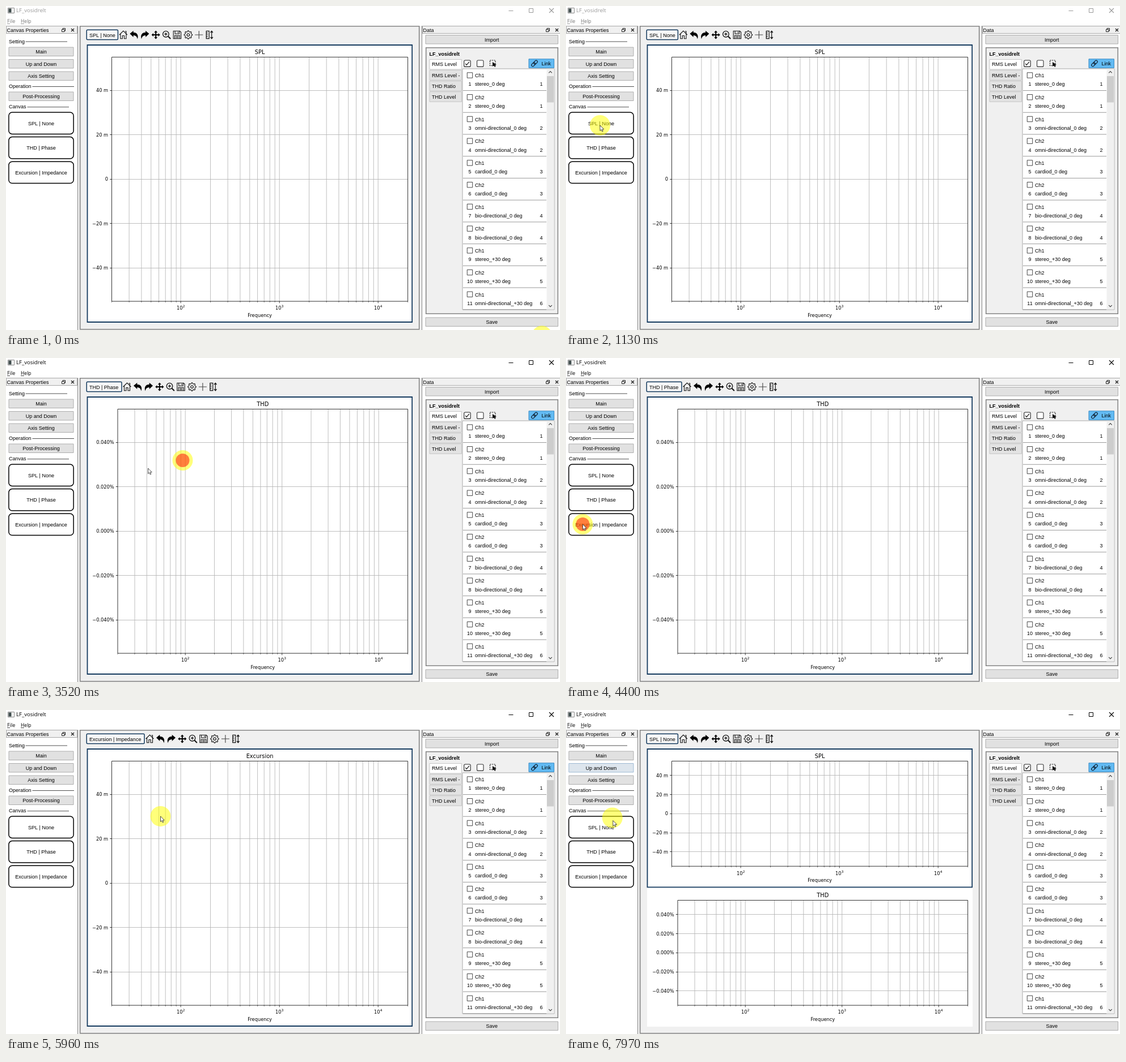
These frames come from a looping animation (977x573 px, 8000 ms). An HTML page with a canvas:

```html
<!DOCTYPE html>
<html lang="en">
<head>
<meta charset="utf-8">
<title>Canvas layout demo</title>
<style>
html, body { margin: 0; width: 100%; height: 100%; overflow: hidden; background: #fff; }
canvas { display: block; width: 977px; height: 573px; }
</style>
</head>
<body>
<canvas id="stage" width="977" height="573"></canvas>
<script>
const ctx = document.getElementById('stage').getContext('2d');
const LOOP = 8000;
const UI = '"Liberation Sans", Arial, sans-serif';
const PLOT = '"DejaVu Sans", sans-serif';
const MENU = '"Open Sans", "Noto Sans", sans-serif';
const NAVY = '#143a5e';
const EDGE = '#858585';
const PROJECT = 'LF_vosidrelt';

// Drawing helpers; text y is the middle of the capitals.
function text(s, x, y, { size = 9, font = UI, align = 'left', color = '#000', weight = '' } = {}) {
  ctx.font = `${weight} ${size}px ${font}`;
  ctx.textAlign = align;
  ctx.fillStyle = color;
  ctx.fillText(s, x, y + size * 0.36);
}

function box(x, y, w, h, fill, stroke, width = 1, radius = 0) {
  ctx.beginPath();
  ctx.roundRect(x, y, w, h, radius);
  if (fill) { ctx.fillStyle = fill; ctx.fill(); }
  if (stroke) { ctx.strokeStyle = stroke; ctx.lineWidth = width; ctx.stroke(); }
}

function line(x1, y1, x2, y2, color = '#000', width = 1) {
  ctx.beginPath();
  ctx.moveTo(x1, y1);
  ctx.lineTo(x2, y2);
  ctx.strokeStyle = color;
  ctx.lineWidth = width;
  ctx.stroke();
}

function shape(d, x, y, { fill, stroke, width = 1.1, flip = 1 } = {}) {
  const path = new Path2D(d);
  ctx.save();
  ctx.translate(x, y);
  ctx.scale(flip, 1);
  if (fill) { ctx.fillStyle = fill; ctx.fill(path); }
  if (stroke) { ctx.strokeStyle = stroke; ctx.lineWidth = width; ctx.stroke(path); }
  ctx.restore();
}

function disc(x, y, r, color) {
  ctx.beginPath();
  ctx.arc(x, y, r, 0, Math.PI * 2);
  ctx.fillStyle = color;
  ctx.fill();
}

function button(label, x, y, w, fill = '#e1e1e1', stroke = '#adadad') {
  box(x, y, w, 15.5, fill, stroke);
  text(label, x + w / 2, y + 8, { align: 'center' });
}

// Window parts
function titleBar(active) {
  const ink = active ? '#000' : '#999';
  const menuInk = active ? '#000' : '#777';
  box(3.5, 3.5, 11, 9, '#fff', '#888');
  box(4.5, 4.5, 5, 7, '#3d4a4a');
  text(PROJECT, 18, 8, { size: 9.6, font: MENU, color: ink });
  line(886.5, 8.5, 894.5, 8.5, ink);
  box(922.5, 4.5, 7, 7, null, ink);
  shape('M-4-4L4 4M4-4L-4 4', 962, 8, { stroke: ink });
  text('File', 2, 27, { font: MENU, color: menuInk });
  text('Help', 26, 27, { size: 8.6, font: MENU, color: menuInk });
  line(2, 31.5, 7, 31.5, menuInk, 0.7);
  line(26, 31.5, 32, 31.5, menuInk, 0.7);
}

function dockTitle(label, x, w) {
  box(x + 0.5, 35.5, w - 1, 13, '#f0f0f0', '#a8a8a8');
  text(label, x + 1.5, 42.5);
  const end = x + w;
  shape('M-1.5-1V-3H3V1.5H1.5M-3-1H1.5V3H-3Z', end - 24.5, 42.5, { stroke: '#222', width: 1 });
  shape('M-2.5-2.5L2.5 2.5M2.5-2.5L-2.5 2.5', end - 8.5, 42.5, { stroke: '#222', width: 1.3 });
}

function section(label, y, from, to) {
  text(label, 5, y);
  line(from, y + 0.5, to, y + 0.5, '#222', 0.8);
}

function leftDock(state) {
  box(0, 49, 126, 524, '#fff');
  dockTitle('Canvas Properties', 0, 126);
  line(126.5, 35, 126.5, 573, EDGE);
  section('Setting', 62.5, 34.5, 108);
  section('Operation', 142, 46.5, 120);
  section('Canvas', 178.2, 37.5, 111);

  const look = { hover: ['#e5f1fb', '#2b8ad8'], focus: ['#dde5ed', '#9db9d3'] }[state] || [];
  button('Main', 5, 73, 114);
  button('Up and Down', 5, 94.5, 114, ...look);
  button('Axis Setting', 5, 116, 114);
  button('Post-Processing', 5, 152, 114);
  ['SPL | None', 'THD | Phase', 'Excursion | Impedance'].forEach((label, i) => {
    const y = 188 + i * 43.6;
    box(4.9, y, 114.2, 38.4, '#fff', '#000', 1.5, 6);
    text(label, 62, y + 19.5, { align: 'center' });
  });
}

function linkIcon(x, y) {
  ctx.save();
  ctx.translate(x, y);
  ctx.rotate(-Math.PI / 4);
  box(-6.5, -2.3, 7.5, 4.6, null, '#123', 1.2, 2.3);
  box(-1, -2.3, 7.5, 4.6, null, '#123', 1.2, 2.3);
  ctx.restore();
}

function rightDock() {
  box(733, 35, 244, 538, '#fff');
  dockTitle('Data', 734, 246);
  line(733.5, 35, 733.5, 573, EDGE);
  button('Import', 740, 51.5, 233.5);
  button('Save', 740, 551, 233.5);
  box(740.7, 73.7, 232.6, 470.6, '#f0f0f0', EDGE, 1.6);
  text(PROJECT, 746.5, 84.5, { weight: 'bold' });

  ['RMS Level', 'RMS Level -', 'THD Ratio', 'THD Level'].forEach((label, i) => {
    const y = 94.5 + i * 19.1;
    box(747, y, 56.5, 17.5, i ? '#e3e3e3' : '#fff', '#c6c6c6');
    text(label, 751, y + 8.7);
  });

  box(807.8, 96, 11.4, 11.4, '#fff', '#222', 1.1, 2);
  shape('M-3 0L-1 2.5L3.5-3', 813.3, 101.8, { stroke: '#111', width: 1.2 });
  box(830.6, 96, 11.4, 11.4, '#fff', '#333', 1.1, 2);
  ctx.setLineDash([2, 1.5]);
  box(853.5, 96, 9.5, 9.5, null, '#111', 1.2);
  ctx.setLineDash([]);
  shape('M0 0L0 8L2.2 6L4 9L5.5 8L4 5.2L7 5Z', 858, 99, { fill: '#111' });
  box(922, 93.8, 44.5, 15.6, '#62baf3', '#3c8cc4');
  linkIcon(932, 101.5);
  text('Link', 944.5, 102);

  box(805, 111, 162, 426, '#fff', '#a8a8a8');
  const modes = ['stereo', 'omni-directional', 'cardiod', 'bio-directional'];
  for (let i = 0; i < 11; i++) {
    const y = 122.6 + i * 38.74, group = i >> 1;
    box(813.3, y - 4.8, 9.4, 9.4, '#fff', '#333', 0.9);
    text('Ch' + (i % 2 + 1), 827, y + 0.4);
    text(i + 1, 818, y + 15.6, { align: 'center' });
    text(`${modes[group % 4]}_${group < 4 ? '0' : '+30'} deg`, 827, y + 15.6);
    text(group + 1, 944, y + 15.6, { align: 'center' });
    line(806, y + 26.9, 953, y + 26.9, '#9a9a9a');
  }
  box(953.5, 111.5, 13, 425, '#f0f0f0');
  box(954, 124, 12, 46.5, '#cdcdcd');
  shape('M-2.8 1.4L0-1.4L2.8 1.4', 960, 117, { stroke: '#444', width: 1.2 });
  shape('M-2.8-1.4L0 1.4L2.8-1.4', 960, 530.5, { stroke: '#444', width: 1.2 });
}

function gear(x, y) {
  ctx.beginPath();
  for (let i = 0; i < 32; i++) {
    const a = (i - 0.5) / 32 * Math.PI * 2, r = i % 4 < 2 ? 7.2 : 5.6;
    ctx.lineTo(x + r * Math.cos(a), y + r * Math.sin(a));
  }
  ctx.closePath();
  ctx.moveTo(x + 2.3, y);
  ctx.arc(x, y, 2.3, 0, Math.PI * 2);
  ctx.strokeStyle = '#111';
  ctx.lineWidth = 1.1;
  ctx.stroke();
}

function toolbar(label, width) {
  const y = 51, x = 151.7 + width, pen = { stroke: '#111' }, solid = { fill: '#000' };
  const arrow = 'M-7.5-2L-1.2-7.3V-4.2C5-4 8.2 0 6 7.6C5 3 3 1-1.2 1V4Z';
  box(142.2, 42.3, width, 17.2, '#f7f7f7', NAVY, 1.5, 1.5);
  text(label, 147, y + 0.5);
  shape('M-7 0L0-7L7 0M-5-1.8V6.7H-1.6V1.5H1.6V6.7H5V-1.8M3-6.3H5V-2', x, y, pen);
  shape(arrow, x + 19, y, solid);
  shape(arrow, x + 38, y, { ...solid, flip: -1 });
  shape('M0-7.6L3-4.3H1V-1H4.3V-3L7.6 0L4.3 3V1H1V4.3H3L0 7.6L-3 4.3H-1V1H-4.3V3L-7.6 0L-4.3-3V-1H-1V-4.3H-3Z', x + 57.3, y, solid);
  shape('M4-1.3A5.3 5.3 0 1 1-6.6-1.3A5.3 5.3 0 1 1 4-1.3M-4-1.3H1.4M-1.3-4V1.4', x + 76.3, y, { stroke: '#111', width: 1.3 });
  shape('M2.8 2.8L7 7', x + 76.3, y, { stroke: '#111', width: 2 });
  shape('M-6.7-6.7H4.7L6.7-4.7V6.7H-6.7ZM-3.8-6.7V-2H3.8V-6.7M1.5-5.5V-3.3M-4.3 6.7V1H4.3V6.7M-2.5 3H2.5M-2.5 5H2.5', x + 95, y, pen);
  gear(x + 114.5, y);
  shape('M-7 0H7M0-7V7', x + 133.4, y, { stroke: '#444' });
  shape('M-3.5-6V6M-5.7-4L-3.5-6.7L-1.3-4M-5.7 4L-3.5 6.7L-1.3 4M1-6.7H6V6.7H1ZM6-3.4H3.5M6 0H3M6 3.4H3.5', x + 152.3, y, { stroke: '#111', width: 1.2, flip: -1 });
}

const CHARTS = {
  spl: { title: 'SPL', left: 186.5, label: v => v ? v + ' m' : '0' },
  thd: { title: 'THD', left: 197, label: v => (v / 1000).toFixed(3) + '%' },
  exc: { title: 'Excursion', left: 186.5, label: v => v ? v + ' m' : '0' }
};

// Log axis from 20 to 20000, linear axis of +-55.
function chart({ title, left, label }, top, bottom) {
  const right = 708.6, mid = (left + right) / 2, grid = '#b4b4b4';
  const px = f => left + (right - left) * Math.log10(f / 20) / 3;
  const py = v => (top + bottom) / 2 - v * (bottom - top) / 110;
  const style = { size: 8.25, font: PLOT };

  for (let d = 10; d <= 10000; d *= 10) {
    for (let n = 1; n < 10; n++) {
      const f = d * n;
      if (f < 20 || f > 20000) continue;
      const x = px(f);
      if (f > 20 && f < 20000) line(x, top, x, bottom, grid, 0.85);
      line(x, bottom, x, bottom + (n === 1 ? 3.2 : 2), '#000', n === 1 ? 0.8 : 0.6);
    }
  }
  for (let v = -40; v <= 40; v += 20) {
    const y = py(v), row = Math.floor(y) + 0.5;
    line(left, row, right, row, grid, 0.85);
    line(left - 3.2, row, left, row, '#000', 0.8);
    text(label(v).replace('-', '\u2212'), left - 6.4, y, { ...style, align: 'right' });
  }
  box(left, top, right - left, bottom - top, null, '#111', 0.85);
  for (let p = 2; p < 5; p++) {
    const x = px(10 ** p) - 7.2;
    text('10', x, bottom + 12.3, style);
    text(p, x + 10.7, bottom + 9.2, { ...style, size: 5.8 });
  }
  text(title, mid, top - 9.3, { size: 9.9, font: PLOT, align: 'center' });
  text('Frequency', mid, bottom + 24.6, { ...style, align: 'center' });
}

function centre(view) {
  box(130.7, 35.7, 598, 536, '#f0f0f0', EDGE, 1.6);
  const [label, width] = {
    thd: ['THD | Phase', 61.8],
    exc: ['Excursion | Impedance', 101.8]
  }[view] || ['SPL | None', 55.2];
  toolbar(label, width);
  box(143, 68, 574, 492, '#fff');
  if (view === 'split') {
    chart(CHARTS.spl, 90.4, 276.3);
    chart(CHARTS.thd, 336.5, 522.2);
  } else {
    chart(CHARTS[view], 90.4, 522.2);
  }
  box(143.5, 69, 572.7, view === 'split' ? 244.3 : 490, null, NAVY, 1.8);
}

// Pointer motion: [time, x, y]
const SPOT = [
  [70, 945, 583.5], [270, 383, 384], [460, 383, 384], [730, 122, 259],
  [930, 122, 259], [1130, 60, 211], [1350, 60, 211], [1670, 44, 247],
  [1740, 40, 247], [1950, 40, 247], [2300, 178, 207], [2500, 252, 190],
  [2570, 311.5, 181], [3600, 311.5, 181], [4070, 29.5, 294], [4670, 29.5, 294],
  [5340, 317, 206], [5800, 317, 206], [6420, 51, 98], [6900, 51, 98],
  [7170, 71, 101], [7760, 71, 101], [7970, 81.8, 190.5]
];
const DRAG_TIP = [[1950, 40, 247], [2300, 252.5, 189], [2770, 252.5, 189], [2910, 250.5, 195]];

// Presses: [from, to, x, y]
const PRESSES = [
  [1740, 2770, 40, 247], [2910, 3600, 311.5, 181],
  [4400, 5340, 29.5, 294], [6570, 6900, 51, 98]
];

function along(track, t) {
  const i = track.findIndex(k => k[0] > t);
  if (i === 0) return track[0].slice(1);
  if (i < 0) return track[track.length - 1].slice(1);
  const [t0, x0, y0] = track[i - 1], [t1, x1, y1] = track[i];
  const u = (t - t0) / (t1 - t0), e = u * u * (3 - 2 * u);
  return [x0 + (x1 - x0) * e, y0 + (y1 - y0) * e];
}

function pointer(t) {
  const yellow = 'rgba(255,255,0,.52)';
  const [x, y] = along(SPOT, t);
  if (t < 2500 || t >= 2570) disc(x, y, 18, yellow);
  if (t >= 2230 && t < 2770) disc(252, 188.5, 9, yellow);
  for (const [from, to, cx, cy] of PRESSES) {
    if (t >= from && t < to) disc(cx, cy, 12, 'rgba(255,0,0,.5)');
  }

  let tip = [x, y];
  if (t >= 1950 && t < 3600) tip = along(DRAG_TIP, t);
  const drop = Math.min(1, Math.max(0, (t - 7760) / 210));
  tip = [tip[0] + drop, tip[1] + drop * 5];
  shape('M0 0V9.6L2.2 7.6L3.7 11L5.3 10.3L3.8 7H6.8Z', ...tip, { fill: '#fff', stroke: '#222', width: 0.8 });

  const dragging = (t >= 2020 && t < 2770) || (t >= 4740 && t < 5340);
  if (dragging) {
    box(tip[0] + 6.5, tip[1] + 11.5, 5, 5, '#fff', '#222', 0.9);
    shape('M-1.5 0H1.5M0-1.5V1.5', tip[0] + 9, tip[1] + 14, { stroke: '#222', width: 0.9 });
  }
}

function draw(now) {
  const t = now % LOOP;
  const view = t < 3120 ? 'spl' : t < 5540 ? 'thd' : t < 7370 ? 'exc' : 'split';
  const state = t < 6350 ? '' : t < 7830 ? 'hover' : 'focus';
  box(0, 0, 977, 573, '#fff');
  box(0, 35, 977, 538, '#f0f0f0');
  titleBar(t >= 1740);
  leftDock(state);
  centre(view);
  rightDock();
  pointer(t);
}

const start = performance.now();
function tick() {
  draw(performance.now() - start);
  requestAnimationFrame(tick);
}
tick();
</script>
</body>
</html>
```
